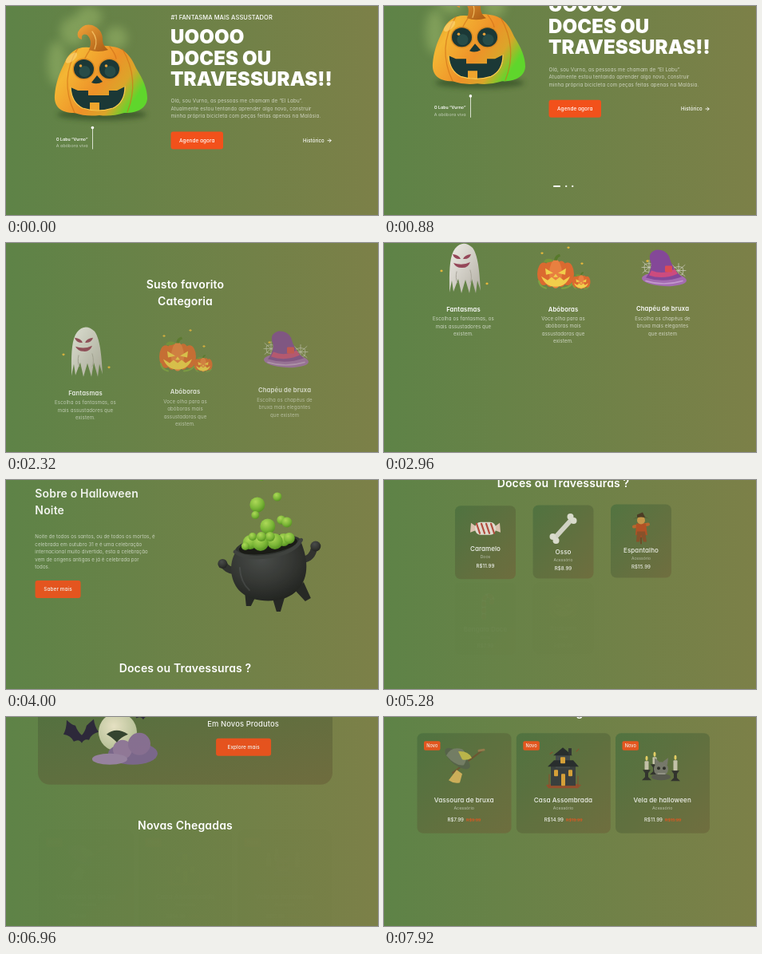
An HTML page that plays this animation: 466 by 262 pixels, repeating every 8000 ms.

```html
<!DOCTYPE html>
<html lang="pt">
<head>
<meta charset="utf-8">
<title>Halloween</title>
<style>
  html, body { margin: 0; width: 100%; height: 100%; overflow: hidden; background: #6d8148; }
  svg { display: block; width: 100%; height: 100%; overflow: hidden; }
  text { font-family: Inter, "Open Sans", sans-serif; font-feature-settings: "cv11"; fill: #fff; }
</style>
</head>
<body>
<svg id="stage" viewBox="0 0 466 262" xmlns="http://www.w3.org/2000/svg"></svg>
<script>
const LOOP = 8000, TICK = 80;
const REVEAL_STEPS = 18, REVEAL_DIST = 23;
const ORANGE = '#f2511b';

// Markup helpers
const text = (x, y, str, size, { w = 400, a = 'start', o = 1, ls = size * 0.011, fill = '#fff', extra = '' } = {}) =>
  `<text x="${x}" y="${y + size * 0.36}" font-size="${size}" font-weight="${w}" text-anchor="${a}" fill-opacity="${o}" letter-spacing="${ls}" style="fill:${fill}" ${extra}>${str}</text>`;
const mid = (x, y, str, size, opt = {}) => text(x, y, str, size, { a: 'middle', ...opt });
const lines = (x, y, gap, rows, size, opt) => rows.map((r, i) => text(x, y + i * gap, r, size, opt)).join('');
const rect = (x, y, w, h, r, fill) => `<rect x="${x}" y="${y}" width="${w}" height="${h}" rx="${r}" fill="${fill}"/>`;
const circle = (x, y, r, fill) => `<circle cx="${x}" cy="${y}" r="${r}" fill="${fill}"/>`;
const oval = (x, y, rx, ry, fill, extra = '') => `<ellipse cx="${x}" cy="${y}" rx="${rx}" ry="${ry}" fill="${fill}" ${extra}/>`;
const path = (d, fill, extra = '') => `<path d="${d}" fill="${fill}" ${extra}/>`;
const stroke = (d, color, w, extra = '') => path(d, 'none', `stroke="${color}" stroke-width="${w}" stroke-linecap="round" ${extra}`);
const move = (x, y, inner, k = 1) => `<g transform="translate(${x} ${y}) scale(${k})">${inner}</g>`;
const section = (top, inner) => `<g data-top="${top}">${inner}</g>`;
const reveal = (start, dx, dy, inner) => `<g data-start="${start}" data-dx="${dx}" data-dy="${dy}">${inner}</g>`;
const button = (x, y, w, h, label) => rect(x, y, w, h, 3, ORANGE) + mid(x + w / 2, y + h / 2, label, 6.4, { w: 500 });
const title = (x, y, str, a = 'middle') => text(x, y, str, 14, { w: 600, a });
const spark = (x, y) => path(`M${x - 2} ${y}l2 -1.6 2 1.6 -2 1.6z`, '#e8b83c');

const stops = list => list.map(([o, c, a = 1]) => `<stop offset="${o}" stop-color="${c}" stop-opacity="${a}"/>`).join('');
const linear = (id, x2, y2, ...list) => `<linearGradient id="${id}" x1="0" y1="0" x2="${x2}" y2="${y2}">${stops(list)}</linearGradient>`;
const radial = (id, cx, cy, r, ...list) => `<radialGradient id="${id}" cx="${cx}" cy="${cy}" r="${r}">${stops(list)}</radialGradient>`;
const blur = (id, n) => `<filter id="${id}" x="-50%" y="-50%" width="200%" height="200%"><feGaussianBlur stdDeviation="${n}"/></filter>`;

const defs = `<defs>
  ${linear('bg', 1, 0, [0, '#5e8347'], [1, '#7c8048'])}
  ${linear('card', 1, 1, [0, '#4e7240'], [1, '#6f6c3e'])}
  ${linear('skin', 1, 0.5, [0, '#e09a22'], [0.25, '#f4b634'], [0.6, '#ee9128'], [0.82, '#dba52a'], [1, '#5fd62c'])}
  ${linear('stem', 1, 1, [0, '#f2a53a'], [1, '#a85a14'])}
  ${linear('sheet', 1, 1, [0, '#f1efe9'], [1, '#b3afa4'])}
  ${radial('slime', 0.38, 0.3, 0.75, [0, '#b4e25a'], [0.6, '#7cbc36'], [1, '#4f8f1c'])}
  ${radial('iron', 0.4, 0.3, 0.75, [0, '#45474a'], [0.55, '#2f3032'], [1, '#18191b'])}
  ${radial('moon', 0.4, 0.35, 0.7, [0, '#f4ecd0'], [1, '#b9c49a'])}
  ${blur('soft', 6)}${blur('shade', 3)}
</defs>`;

// Pictures
const heroPumpkin = () => {
  const smoke = [[64, 72, 12, 28], [84, 32, 16, 18], [104, 14, 16, 14], [138, 40, 14, 14]]
    .map(([x, y, a, b]) => oval(x, y, a, b, '#9dba6c', 'opacity=".5" filter="url(#soft)"')).join('');
  const ribs = ['M90 53Q66 92 86 134', 'M108 51Q100 62 98 68', 'M130 51Q137 60 138 66', 'M146 54Q168 92 152 133']
    .map(d => stroke(d, '#cf6d17', 1.3, 'opacity=".6"')).join('');
  const eye = (x, y) => oval(x, y, 14, 13.5, '#d98a22') + oval(x, y, 12.5, 12, '#1b3836') +
    oval(x + 1, y + 3, 7, 7, '#274c48') + circle(x - 4, y - 4, 1.8, '#e8a23a');
  return smoke +
    oval(120, 136, 56, 7, '#2d4a20', 'opacity=".65" filter="url(#shade)"') +
    path('M61 112C62 98 66 86 73 72C79 56 92 50 104 52Q118 48 134 51C150 53 158 66 163 78C172 92 177 104 177 116C176 130 160 135 148 134Q132 139 117 137Q100 139 86 134C68 134 60 126 61 112Z', 'url(#skin)') +
    ribs + oval(82, 65, 9, 4, '#ffe08a', 'opacity=".5" transform="rotate(-42 82 65)"') +
    path('M104 55Q109 42 101 36Q94 34 95 42Q88 40 90 33Q96 21 108 24Q121 29 121 42Q121 50 128 55Q115 59 104 55Z', 'url(#stem)') +
    stroke('M111 54Q116 42 108 32', '#ffd376', 1.3, 'opacity=".7"') +
    eye(97.5, 79) + eye(129.5, 79) +
    path('M114 87L107 96Q114 99 121 95Z', '#1b3836') +
    path('M81 102L90 106H103V112H129V106H139L149 101Q149 121 134 128Q115 134 96 128Q82 121 81 102Z', '#1b3836') +
    path('M105 121h12v10q-6 0 -12 -1z', '#f0a52d') +
    stroke('M81 102Q82 121 96 128Q115 134 134 128Q149 121 149 101', '#ffcb4f', 1.2);
};

const jack = k => [-15, 15, -7, 7, 0].map(x => oval(x, 0, 8, 18 - Math.abs(x) * 0.25, x ? '#dd6a30' : '#ea8040')).join('') +
  path('M-2 -17Q-1 -24 5 -25L6 -22Q2 -21 2 -17Z', '#587a2c') + path('M-2 -17Q-12 -22 -15 -15Q-8 -13 -2 -17Z', '#77963a') +
  path('M-13 -7L-3 -1 -12 1ZM13 -7L3 -1 12 1ZM0 0l3 4 -6 0z', k) +
  path('M-18 3L-10 8 -5 4 0 8 5 4 10 8 18 3Q13 16 0 16Q-13 16 -18 3Z', k) +
  stroke('M-21 9Q-20 16 -12 18M21 12Q16 18 8 18', '#7fa342', 2);

const ghost = () => path('M82 62C82 42 81 17 89 7Q99 -5 111 6C119 17 120 44 121 60l-4 -13 -2 16 -5 -18 -3 18 -5 -17 -5 17 -4 -18 -6 16 -2 -14z', 'url(#sheet)') +
  path('M86 14Q94 15 96 20Q88 21 86 14ZM109 14Q101 15 99 20Q107 21 109 14Z', '#96475a') +
  path('M87 25Q98 29 108 24Q105 32 97 31Q90 31 87 25Z', '#96475a') + stroke('M91 36Q89 44 92 50M108 34Q111 44 108 50', '#aaa69b', 1);

const hat = () => {
  const web = (x, y) => stroke(`M${x - 8} ${y - 7}l16 14M${x + 8} ${y - 7}l-16 14M${x - 9} ${y}h18M${x} ${y - 9}v18M${x - 5} ${y - 4}l5 -1 5 1 1 4 -1 5 -5 1 -5 -1 -1 -5z`, '#d3d1c8', 0.7);
  return web(332, 31) + web(369, 35) +
    oval(351, 46, 28, 8.5, '#a56cb4', 'transform="rotate(3 351 46)"') +
    path('M328 44Q338 31 333 21Q331 12 341 9Q352 8 357 17Q361 33 373 43Q350 51 328 44Z', '#85479a') +
    path('M335 35Q350 41 364 33L368 39Q350 47 332 41Z', '#cf4a80') + rect(352, 29, 9, 8, 1, '#df4a56') +
    stroke('M328 48Q350 55 374 48', '#c59bd0', 1.6);
};

const cauldron = () => {
  const ball = (x, y, r) => circle(x, y, r, 'url(#slime)');
  const air = [[315, 31, 9.5], [340, 21, 5.5], [312.5, 44, 5], [328, 58, 9.5], [345, 50, 5.5], [352, 53, 6.5], [320, -3, 4]];
  const foam = [[306, 78, 9], [348, 75, 8], [337, 77, 10], [319, 79, 10], [355, 73, 7], [309, 71, 5], [331, 71, 6], [320, 71, 6], [300, 83, 5]];
  return air.map(b => ball(...b)).join('') +
    stroke('M287 114Q277 113 273 106', '#2a2b2d', 9) + circle(271.5, 105, 6, 'url(#iron)') +
    stroke('M372 100Q384 98 386 86', '#2a2b2d', 8) + circle(388, 83, 6.5, 'url(#iron)') +
    path('M299 138l2 20 6 0 6 -12zM334 148l5 17 5 0 5 -17zM362 138l13 14 7 -4 -9 -20z', '#1f2022') +
    path('M288 90C279 104 280 128 295 141C311 155 346 155 362 141C380 126 380 102 369 76Z', 'url(#iron)') +
    oval(328.5, 83, 42, 13, '#2b2d2f', 'transform="rotate(-9 328.5 83)"') +
    oval(328.5, 82, 37, 10, '#111', 'transform="rotate(-9 328.5 82)"') +
    foam.map(b => ball(...b)).join('') +
    stroke('M287 90Q300 100 330 96Q362 91 370 75', '#3a3c3e', 4.5) +
    stroke('M293 110Q294 128 305 138', '#626569', 2, 'opacity=".35"');
};

const caramel = () => path('M-11 -2L-18 -7 -19 5 -11 2zM11 -2L18 -7 19 5 11 2z', '#e5c8b8') + rect(-13, -8, 26, 16, 7, '#e8e2d8') +
  [-9, -3, 3, 9].map(x => stroke(`M${x - 2} -6L${x + 2} 6`, '#b8473c', 2.2)).join('');
const bone = () => stroke('M-10 11L10 -11', '#dcdcd2', 6) +
  [[-13, 10], [-9, 15], [9, -15], [13, -10]].map(([x, y]) => circle(x, y, 4, '#e6e6dc')).join('');
const scarecrow = () => stroke('M0 0V19', '#6b4423', 2) + stroke('M-9 -2L9 -5', '#c4652a', 4) +
  path('M-6 -6H6L8 9 3 7 0 12 -3 7 -7 9Z', '#bd4a20') + path('M-5 4l-1 13 4 0 2 -9 3 9 4 0 -2 -13z', '#8b4a26') +
  circle(0, -10, 5, '#d59a4a') + path('M-10 -12Q0 -16 10 -12L5 -14 2 -20 -5 -17 -5 -13Z', '#46301f');
const cane = () => stroke('M-2 15V-6Q-1 -14 6 -12Q10 -9 8 -4', '#ece6dc', 5) +
  stroke('M-2 15V-6Q-1 -14 6 -12Q10 -9 8 -4', '#c23a34', 5, 'stroke-dasharray="2 6"');

const bats = () => {
  const bat = 'M0 0Q-5 -4 -8 -12Q-13 -13 -19 -19Q-19 -8 -23 -1Q-14 0 -10 8Q-3 4 0 10Q3 4 9 6Q12 -2 21 -4Q16 -11 15 -20Q9 -15 6 -12Q4 -4 0 0Z';
  return circle(122, 169, 24, 'url(#moon)') +
    oval(141, 196, 31, 14, '#7d6792') + circle(128, 191, 12, '#95799f') + circle(149, 184, 14, '#8b7098') + oval(112, 203, 22, 7, '#9c84a8') +
    move(77, 173, path(bat, '#29233a')) + move(154, 145, path(bat, '#29233a'), 0.85) + path('M108 172Q120 162 135 172Q125 176 121 182Q113 174 108 172Z', '#32402f');
};

const broom = () => stroke('M86 70L124 41', '#6d5130', 2) + path('M91 66L81 79Q88 84 95 82L98 71Z', '#d9b45c') +
  oval(92, 52, 19, 8, '#55604a', 'transform="rotate(38 92 52)"') + path('M78 48Q84 36 98 40Q107 48 100 60Q90 62 78 48Z', '#757d68') +
  path('M93 43Q105 42 110 51Q103 55 98 53Z', '#c5bb4b') + stroke('M119 42l6 -1', '#9a7a4c', 3);
const house = () => path('M203 85Q225 79 247 85L243 89H206Z', '#9a4a2b') +
  rect(209, 60, 31, 26, 0, '#34383d') + rect(215, 45, 18, 19, 0, '#3f444a') +
  path('M205 62L213 54H237L244 62ZM212 48L224 38 236 48Z', '#22252b') + rect(231, 39, 4, 8, 0, '#2a2d31') +
  [[213, 66, 5, 8], [221, 50, 6, 8], [231, 66, 5, 8], [222, 71, 5, 15]].map(([x, y, w, h]) => rect(x, y, w, h, 1, '#e2a437')).join('') +
  stroke('M207 87V72M243 87V74M208 46l3 -2M241 43l3 -3', '#8a4d2c', 1.2);
const candles = () => {
  const candle = (x, y, h) => rect(x - 2.5, y, 5, h, 1, '#cdc9b4') + oval(x, y - 3.5, 1.5, 3, '#f0d768') +
    path(`M${x - 5} ${y + h}h10l-3 4 0 5 4 4 -12 0 4 -4 0 -5z`, '#2b2b2b');
  return candle(329, 55, 11) + candle(365, 54, 13) + candle(339, 50, 9) +
    circle(347, 65, 9, '#77786f') + path('M339 60l0 -9 6 5zM355 60l1 -9 -7 5z', '#77786f') +
    circle(344, 64, 2, '#262626') + circle(351, 64, 2, '#262626') + oval(347, 75, 12, 4, '#55564f') +
    stroke('M343 71h9', '#bdbbb0', 1);
};

// Sections: coordinates are local to a scroll offset
const hero = section(0,
  heroPumpkin() +
  text(206.5, 14, '#1 FANTASMA MAIS ASSUSTADOR', 7.5, { w: 500 }) +
  lines(206, 38.5, 26.4, ['UOOOO', 'DOCES OU', 'TRAVESSURAS!!'], 24, { w: 900, ls: 0.12 }) +
  lines(206.5, 119, 9.6, ['Olá, sou Vurno, as pessoas me chamam de “El Labu”.', 'Atualmente estou tentando aprender algo novo, construir',
    'minha própria bicicleta com peças feitas apenas na Malásia.'], 6.2, { o: 0.66, ls: 0.15 }) +
  text(102.5, 167, 'O Labu “Vurno”', 5.1, { w: 600, a: 'end' }) +
  text(102.5, 175.5, 'A abóbora viva', 5.4, { a: 'end', o: 0.62 }) +
  rect(108, 153, 0.9, 26.5, 0, '#e8ece0') + circle(108.4, 152.6, 1.8, '#fff') +
  button(206.5, 157.5, 65.5, 22, 'Agende agora') +
  text(372, 168.7, 'Histórico', 6.1, { w: 500 }) +
  stroke('M403 168.7H407M405.2 166.7L407.2 168.7 405.2 170.7', '#fff', 0.9) +
  rect(212, 264.7, 9, 1.9, 0.9, '#fff') + circle(228.2, 265.6, 1.2, '#e9eee2') + circle(236.2, 265.6, 1.2, '#e9eee2') +
  title(224.5, 322.5, 'Susto favorito') + title(224.5, 343.5, 'Categoria'));

const category = (x, start, art, name, rows) => reveal(start, 0, -1, art + mid(x, 83, name, 7.7, { w: 600, ls: 0.15 }) +
  lines(x, 95, 9.5, rows, 6.1, { a: 'middle', o: 0.68, ls: 0.12 }));
const categories = section(378.5,
  category(99.5, 14, ghost() + spark(72, 35) + spark(129, 51), 'Fantasmas', ['Escolha os fantasmas, os', 'mais assustadores que', 'existem.']) +
  category(224.5, 15, move(215, 39, jack('#f3cf4c')) + move(247, 49, jack('#f3cf4c'), 0.5) + spark(231, 6) + spark(248, 26) + spark(198, 13),
    'Abóboras', ['Voce olha para as', 'abóboras mais', 'assustadoras que', 'existem.']) +
  category(349, 16, hat() + spark(330, 23), 'Chapéu de bruxa', ['Escolha os chapéus de', 'bruxa mais elegantes', 'que existem']));

const about = section(580,
  reveal(29.6, -1, 0, title(38.5, 16.5, 'Sobre o Halloween', 'start') + title(38.5, 37.5, 'Noite', 'start') +
    lines(38.5, 71, 9.5, ['Noite de todos os santos, ou de todos os mortos, é', 'celebrada em outubro 31 e é uma celebração',
      'internacional muito divertido, esta a celebração', 'vem de origens antigas e já é celebrada por', 'todos.'], 6.1, { o: 0.7 }) +
    button(38.7, 126, 57, 22, 'Saber mais')) +
  reveal(29.6, 1, 0, move(-2.3, 0, cauldron())));

const treat = (i, start, top, h, art, artY, nameY, name, kind, price) => {
  const x = 89 + i * 97.5, c = x + 38;
  return reveal(start + i, 0, -1, rect(x, top, 76, h, 7, 'url(#card)') + move(c, artY, art) +
    mid(c, nameY, name, 8, { w: 500 }) + mid(c, nameY + 10, kind, 5, { o: 0.62 }) + mid(c, nameY + 21, price, 6.1, { w: 500 }));
};
const treats = section(812,
  title(224.5, 4, 'Doces ou Travessuras ?') +
  treat(0, 42, 34, 92, caramel(), 62.5, 88.3, 'Caramelo', 'Doce', 'R$11.99') +
  treat(1, 42, 34, 92, bone(), 63.5, 92.5, 'Osso', 'Acessório', 'R$8.99') +
  treat(2, 42, 34, 92, scarecrow(), 64, 91.5, 'Espantalho', 'Acessório', 'R$15.99') +
  treat(0, 51, 151, 90.7, cane(), 180, 209.7, 'Bengala Doce', 'Doce', 'R$7.99') +
  treat(1, 51, 151, 90.7, move(0, 2, jack('#f3cf4c'), 0.75), 180, 209.4, 'Abóbora', 'Doce', 'R$19.99') +
  treat(2, 51, 151, 90.7, move(-40, -18, ghost(), 0.4), 185, 209.4, 'Fantasma', 'Acessório', 'R$17.99'));

const discount = section(1008,
  rect(40, 103, 369, 132, 15, 'url(#card)') +
  reveal(59.5, -1, 0, move(20, 0, bats())) +
  reveal(59.5, 1, 0, mid(295, 145, '50% De Desconto', 9.4, { w: 500 }) + mid(295, 158.5, 'Em Novos Produtos', 9.4, { w: 500 }) +
    button(261, 177, 69, 22, 'Explore mais')));

const arrival = (x, art, name, price, old, split) => rect(x, 20, 118, 125.5, 7, 'url(#card)') +
  rect(x + 8.5, 30, 20.5, 11.5, 2, ORANGE) + mid(x + 18.8, 35.8, 'Novo', 5.6, { w: 500 }) + art +
  mid(x + 58.7, 104, name, 8.1, { w: 500 }) + mid(x + 58.7, 114, 'Acessório', 5.3, { o: 0.65 }) +
  text(split, 128.5, price, 6.1, { w: 500, a: 'end' }) +
  text(split + 3, 128.5, old, 5.3, { fill: ORANGE, extra: 'text-decoration="line-through"' });
const arrivals = section(1300,
  title(224.5, -6, 'Novas Chegadas') +
  reveal(69, 0, -1, move(0, 2.6,
    arrival(41.5, broom(), 'Vassoura de bruxa', 'R$7.99', 'R$9.99', 100) +
    arrival(165.8, house(), 'Casa Assombrada', 'R$14.99', 'R$19.99', 225) +
    arrival(290, candles(), 'Vela de halloween', 'R$11.99', 'R$15.99', 349))));

const stage = document.getElementById('stage');
stage.innerHTML = defs + rect(0, 0, 466, 262, 0, 'url(#bg)') + hero + categories + about + treats + discount + arrivals;
const sections = [...stage.querySelectorAll('[data-top]')];
const reveals = [...stage.querySelectorAll('[data-start]')];

// Scroll speeds up from rest, then follows straight stretches of [step, offset]
const track = [[12, 81], [16, 146.5], [22, 253.5], [26, 320.5], [30, 378.5], [38, 548], [42, 612], [53, 812], [63, 1008], [74, 1244], [79, 1300]];
function scrollAt(step) {
  if (step <= 2) return 0;
  if (step < 12) return 0.81 * (step - 2) ** 2;
  const i = Math.max(1, track.findIndex(p => p[0] >= step));
  const [s0, y0] = track[i - 1], [s1, y1] = track[i];
  return y0 + (y1 - y0) * (step - s0) / (s1 - s0);
}

// cubic-bezier(.5, 0, 0, 1)
function ease(x) {
  if (x <= 0) return 0;
  if (x >= 1) return 1;
  let lo = 0, hi = 1;
  for (let i = 0; i < 24; i++) {
    const u = (lo + hi) / 2;
    if (1.5 * (1 - u) ** 2 * u + u ** 3 < x) lo = u; else hi = u;
  }
  return lo * lo * (3 - 2 * lo);
}

function render(ms) {
  const tick = Math.floor((ms % LOOP) / TICK);
  const step = tick - Math.floor((tick + 2) / 5); // every fifth tick repeats the last picture
  const scroll = scrollAt(step);
  for (const el of sections) el.setAttribute('transform', `translate(0 ${el.dataset.top - scroll})`);
  for (const el of reveals) {
    const { start, dx, dy } = el.dataset;
    const p = ease((step - start) / REVEAL_STEPS), rest = REVEAL_DIST * (1 - p);
    el.setAttribute('transform', `translate(${dx * rest} ${dy * rest})`);
    el.setAttribute('opacity', p);
  }
}

const begin = performance.now();
function loop() {
  render(performance.now() - begin);
  requestAnimationFrame(loop);
}
loop();
</script>
</body>
</html>
```
